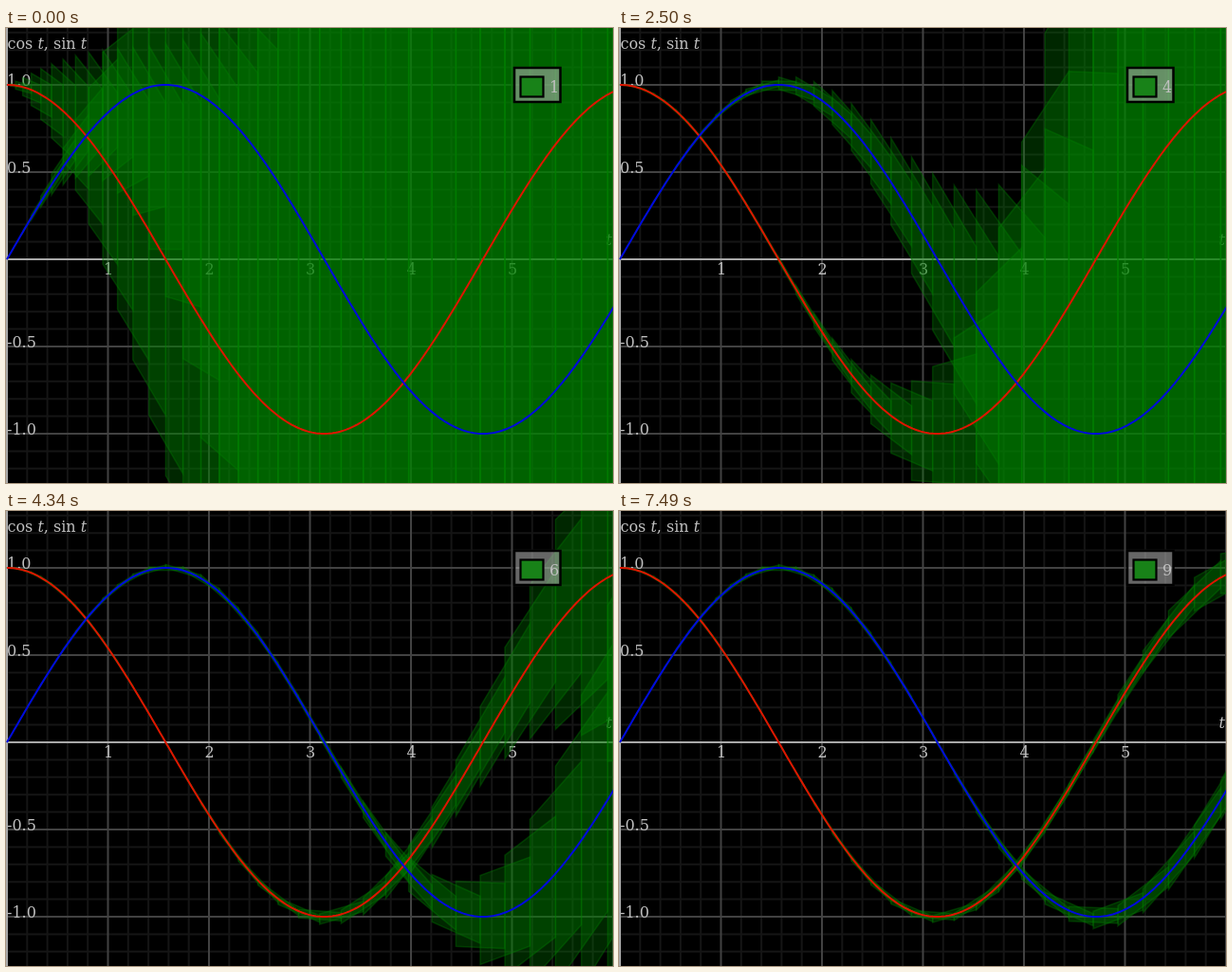
Recreate the animation shown at these times as an HTML page. Size 640x480 px, loop 8000 ms.

```html
<!DOCTYPE html>
<html lang="en">
<head>
<meta charset="utf-8">
<title>Enclosures of cos t and sin t</title>
<style>
  html, body { margin: 0; width: 100%; height: 100%; overflow: hidden; background: #000; }
  svg { display: block; width: 640px; height: 480px; background: #000; }
  text { font: 16px "DejaVu Serif", "Noto Serif", serif; fill: #c0c0c0; }
  .it { font-style: italic; }
  .minor { stroke: #151515; stroke-width: 2; }
  .major { stroke: #424242; stroke-width: 2; }
  .axis { stroke: #a8a8a8; stroke-width: 2; }
  .tube { fill: rgba(0,128,0,.3); stroke: rgba(0,128,0,.34); stroke-width: 1.5; }
  .curve { fill: none; stroke-width: 2; }
</style>
</head>
<body>
<svg id="stage" viewBox="0 0 640 480">
  <g id="grid"></g>
  <g id="labels"></g>
  <g id="tubes"></g>
  <g id="curves"></g>
  <rect x="536" y="42" width="48.5" height="36" fill="rgba(180,180,180,.57)" stroke="#000" stroke-width="2.5"/>
  <rect x="542.5" y="51.5" width="24" height="21" fill="#188218" stroke="#000" stroke-width="2.2"/>
  <g id="counts"></g>
</svg>
<script>
const NS = 'http://www.w3.org/2000/svg';
const LOOP = 8000;
const px = t => 1 + 106.5 * t;
const py = v => 244 - 184 * v;
const byId = id => document.getElementById(id);

function add(parent, tag, attrs, text) {
  const node = document.createElementNS(NS, tag);
  for (const name in attrs) node.setAttribute(name, attrs[name]);
  if (text !== undefined) node.textContent = text;
  parent.appendChild(node);
  return node;
}

const vLine = (t, cls) => add(byId('grid'), 'path', { class: cls, d: `M${px(t)} 0V480` });
const hLine = (v, cls) => add(byId('grid'), 'path', { class: cls, d: `M0 ${py(v)}H640` });

function drawAxes() {
  for (let i = 1; i < 30; i++) if (i % 5) vLine(i / 5, 'minor');
  for (let i = -12; i <= 13; i++) if (i % 5) hLine(i / 10, 'minor');
  for (let t = 1; t <= 6; t++) vLine(t, 'major');
  for (const v of [-1, -.5, .5, 1]) hLine(v, 'major');
  vLine(0, 'axis');
  hLine(0, 'axis');

  const labels = byId('labels');
  for (const v of [-1, -.5, .5, 1]) add(labels, 'text', { x: 1, y: py(v) + 1 }, v.toFixed(1));
  for (let t = 1; t <= 5; t++)
    add(labels, 'text', { x: px(t) + .5, y: 260, 'text-anchor': 'middle' }, t);
  add(labels, 'text', { x: 632.5, y: 229, class: 'it' }, 't');
  const title = add(labels, 'text', { x: 1.5, y: 22 });
  ['cos ', 't', ', sin ', 't'].forEach((part, i) =>
    add(title, 'tspan', { class: i % 2 ? 'it' : '' }, part));
}

function drawCurve(f, color) {
  let d = '';
  for (let t = 0; t <= 6.02; t += .02) d += `${d ? 'L' : 'M'}${px(t).toFixed(2)} ${py(f(t)).toFixed(2)}`;
  add(byId('curves'), 'path', { class: 'curve', stroke: color, d });
}

// Each pass: start time, then where the radius reaches 1 and its growth power, for cos and sin.
const passes = [
  { at: 0,    cos: [1.35, 1.4], sin: [1.45, 2.4] },
  { at: 500,  cos: [2.05, 2.4], sin: [2.15, 2.7] },
  { at: 1560, cos: [2.7, 3.2],  sin: [2.85, 3.2] },
  { at: 2500, cos: [3.75, 5],   sin: [3.75, 4.2] },
  { at: 3430, cos: [4.85, 5.8], sin: [4.95, 6.2] },
  { at: 4210, cos: [5.9, 6.5],  sin: [5.85, 6.5], fade: 130 },
  { at: 5370, cos: [7.28, 6.5], sin: [6.68, 7.5] },
  { at: 6580, cos: [8.4, 5.5],  sin: [7.65, 6.2] },
  { at: 7490, cos: [10, 4.6],   sin: [8.95, 5.4] }
];

const node = k => .03 * k ** 1.5;

// Overlapping slices, each a chord over two steps with a constant radius,
// widened on the outer side of the bend by the height of the arc above its chord.
function drawTube(group, f, [reach, power]) {
  for (let k = 0; node(k) < 6; k++) {
    const a = node(k), b = node(k + 2);
    const r = (a / reach) ** power;
    const arc = 1.3 * f((a + b) / 2) * (b - a) ** 2 / 8;
    const up = r + Math.max(arc, 0), down = r - Math.min(arc, 0);
    const corners = [[a, f(a) + up], [b, f(b) + up], [b, f(b) - down], [a, f(a) - down]];
    add(group, 'polygon', {
      class: 'tube',
      points: corners.map(([t, v]) => `${px(t).toFixed(1)},${py(v).toFixed(1)}`).join(' ')
    });
  }
}

drawAxes();
passes.forEach((pass, i) => {
  pass.tubes = add(byId('tubes'), 'g', {});
  drawTube(pass.tubes, Math.cos, pass.cos);
  drawTube(pass.tubes, Math.sin, pass.sin);
  pass.count = add(byId('counts'), 'text', { x: 573, y: 67.5 }, i + 1);
});
drawCurve(Math.cos, '#e01400');
drawCurve(Math.sin, '#0008e0');

function show(pass, opacity) {
  for (const part of [pass.tubes, pass.count]) {
    part.style.display = opacity ? '' : 'none';
    part.style.opacity = opacity;
  }
}

function render(ms) {
  let now = 0;
  passes.forEach((pass, i) => { if (ms >= pass.at) now = i; });
  const { at, fade } = passes[now];
  const mix = fade ? Math.min(3, 1 + Math.floor((ms - at) / fade * 2)) / 3 : 1;
  passes.forEach((pass, i) => show(pass, i === now ? mix : i === now - 1 ? 1 - mix : 0));
}

let start;
function tick(time) {
  start ??= time;
  render((time - start) % LOOP);
  requestAnimationFrame(tick);
}
render(0);
requestAnimationFrame(tick);
</script>
</body>
</html>
```
